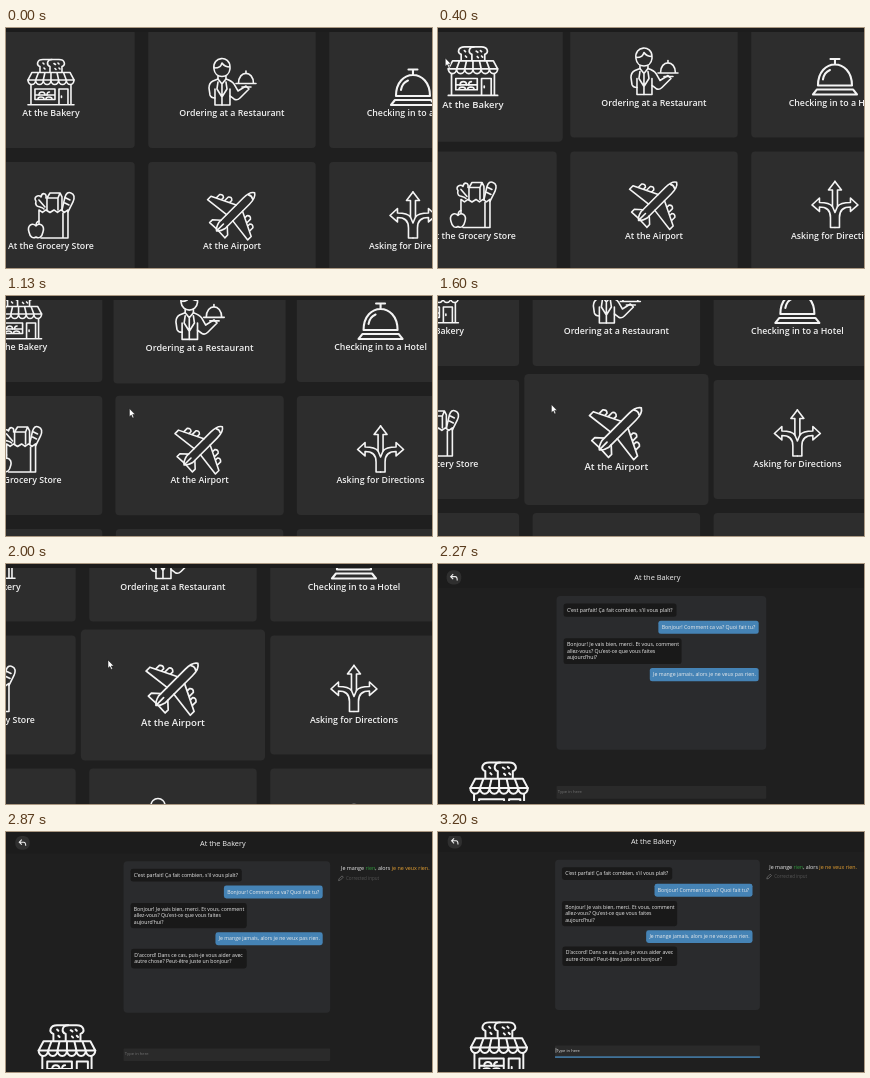
An HTML page that plays this animation: 426x240 px, repeating every 3270 ms.

```html
<!DOCTYPE html>
<html lang="en">
<head>
<meta charset="utf-8">
<title>Conversation practice</title>
<style>
  html, body { margin: 0; width: 100%; height: 100%; overflow: hidden; background: #1f1f1f; }
  svg { display: block; width: 100vw; height: 100vh; font-family: "Open Sans", "Noto Sans", sans-serif; }
  text { white-space: pre; }
  .icon { fill: none; stroke: #f4f4f4; stroke-width: 1.6; stroke-linejoin: round; stroke-linecap: round; }
  .label { fill: #f0f0f0; font-size: 8.8px; font-weight: 600; text-anchor: middle; }
  .chat { fill: #ececec; font-size: 5.2px; }
</style>
</head>
<body>
<svg viewBox="0 0 426 240" id="stage"></svg>
<script>
const LOOP = 3270, CUT = 2270;
const CARD = { w: 167.5, h: 119, dx: 181, dy: 133, x: 45, y: 1 };

const mirror = d => `<path d="${d}"/><path transform="scale(-1 1)" d="${d}"/>`;

// Icons have their top centre at 0,0 and are about 47 px wide and high.
const icons = {
  bakery: `
    <path d="M-1 13V7.500C-5 6-4 .5 1 .5H8C14 .5 15 6 11 7.500V13"/>
    <path d="M-11 13V7.500C-15 6-14 .5-8 .5H1"/>
    <path d="M-8 4l1 1M-7 9l1 1M3 4.500l1.500 1M7 4l1 1M4 9.500l1 1M8 9l1 1"/>
    <path d="M-19 13.500H19L23 21H-23ZM-12.500 13.500L-15.300 21M-6 13.500L-7.700 21M0 13.500V21M6 13.500L7.700 21M12.500 13.500L15.300 21"/>
    <path d="M-23 21${'a3.83 4.500 0 0 0 7.667 0'.repeat(6)}"/>
    <path d="M-20 26V45M20 26V45M-23 45.800H23M-16 30H4V40.500H-16ZM-16 36H4M8 45V30H17V45M10.500 37V38.500"/>
    <path d="M-12 36q0-3 3-3t3 3M-4 36q0-3 2.500-3M-13 40q0-2 3-2t3 2M-5 40q0-2 3-2t3 2"/>`,
  waiter: `
    <path d="M-18 10C-20-3-2-4-2 8V10C-3 20-17 20-18 10ZM-18 9C-12 9-11 7-10 4C-8 7-5 8-2 8"/>
    <path d="M-14 17V20L-19 22Q-23 24-23 29L-22 36Q-21 39-17 39V46H-2V37L2 40Q5 42 8 39L17 30L14 27L6 32L2 25Q0 22-6 20V17"/>
    <path d="M-14 20L-10 25L-6 20M-17 39V30M-2 37V30M-10 25V46M-14 23l-1 7 5 8 5-8-1-7"/>
    <path d="M4 24.500H24M6.500 24.500C6.500 11 21.500 11 21.500 24.500M14 14V12M10 28H19"/>`,
  bell: `
    <g stroke-width="2.100">
      <path d="M-4.500 10.500H4.500M0 11V16M-17 37C-17 9 17 9 17 37ZM-12 31Q-11 24-5 21.500"/>
      <path d="M-18 41H18L22 46H-22Z"/>
    </g>`,
  grocery: `
    <path d="M-12 32V18l3.500 2.500 3.500-2.500 4 2.500 4-2.500 3.500 2.500 3.500-2.500 3.500 2.500 3.500-2.500V46H-10M12 21V46"/>
    <path d="M11 18L14 5Q16-1 20 1Q25 3 22 10L17 20M15 6l4 2M14 11l4 2"/>
    <path d="M-4 18V6L-1 1H9L11 5V18M-4 6H7L9 1M7 6V18"/>
    <path d="M-7 17C-10 14-17 16-15 9C-18 6-13 2-10 5C-9 0-4 1-5 6M-12 8L-6 15"/>
    <path d="M-15 34C-19 30-24 34-22 40C-21 45-18 47-15 45C-12 47-9 45-8 40C-6 34-11 30-15 34ZM-15 34Q-15 30-12 29"/>`,
  plane: `
    <g transform="translate(.5 23) rotate(45) scale(.98)">
      <path d="M0-32C-3.500-30-4.500-24-4.500-20V15Q-3 21 0 23Q3 21 4.500 15V-20C4.500-24 3.500-30 0-32ZM-3-26Q0-28 3-26M0 13V23"/>
      ${mirror('M4.500-10L29 2V7L4.500 4M4.500 12L11 18V22L1.500 21.500M11-7V-10Q13.500-13 16-10V-4.500M19-3V-6Q21.500-8.500 24-5.500V-.5')}
    </g>`,
  arrows: `
    ${mirror('M0 0L6.500 8.500H2.500V25C5 21.500 9 21 15.500 21V16.500L23 23.500L15.500 30V25.500C9 25.500 4.500 28 4.500 36V46H0')}
    <path d="M-2.500 25L0 31L2.500 25"/>`,
  person: `<circle cx="-15" cy="7" r="7"/><path d="M-24 30C-24 16-6 16-6 30M4 14H22V30H4ZM8 20H18"/>`,
  badge: `<circle cy="16" r="10"/><path d="M-18 40C-18 24 18 24 18 40Z"/>`,
};

const cards = [
  [0, 0, 'bakery', 'At the Bakery', 205, 780],
  [1, 0, 'waiter', 'Ordering at a Restaurant', 790, 935],
  [2, 0, 'bell', 'Checking in to a Hotel'],
  [0, 1, 'grocery', 'At the Grocery Store'],
  [2, 1, 'arrows', 'Asking for Directions'],
  [0, 2, 'bell', ''],
  [1, 2, 'person', ''],
  [2, 2, 'badge', ''],
  [1, 1, 'plane', 'At the Airport', 1090, 9999],
].map(([col, row, icon, label, enter, leave]) => ({
  x: CARD.x + col * CARD.dx, y: CARD.y + row * CARD.dy + CARD.h / 2, icon, label, enter, leave,
}));

const cardMarkup = c => `
  <g class="card">
    <rect x="${-CARD.w / 2}" y="${-CARD.h / 2}" width="${CARD.w}" height="${CARD.h}" rx="4" fill="#2d2d2d"/>
    <g class="icon" transform="translate(0 -29.500)">${icons[c.icon]}</g>
    <text class="label" y="27.800">${c.label}</text>
  </g>`;

const bubble = (x, y, w, h, fill, lines, pad = 3.300) => `
  <rect x="${x}" y="${y}" width="${w}" height="${h}" rx="2.500" fill="${fill}"/>
  ${lines.map((s, i) => `<text class="chat" x="${x + pad}" y="${y + 8 + i * 6.400}">${s}</text>`).join('')}`;

const DARK = '#191919', BLUE = '#4583b5';

document.getElementById('stage').innerHTML = `
  <rect width="426" height="240" fill="#1f1f1f"/>
  <g id="menu">
    <g id="grid">${cards.map(cardMarkup).join('')}</g>
    <path id="cursor" d="M0 0V8.200L1.900 6.600L3.200 9.500L4.600 8.900L3.300 6H5.800Z" fill="#fff" stroke="#111" stroke-width=".5"/>
  </g>
  <g id="talk">
    <g id="view">
      <rect x="-10" y="-10" width="460" height="32.500" fill="#1c1c1c"/>
      <rect x="9" y="5" width="14.500" height="14" rx="6" fill="#2f2f2f"/>
      <path d="M15.500 8.800L13 11.300L15.500 13.800M13 11.300H17.500Q19.500 11.300 19.500 15" fill="none" stroke="#eee" stroke-width="1.100"/>
      <text x="218" y="15" fill="#f0f0f0" font-size="7.400" text-anchor="middle">At the Bakery</text>
      <rect x="118" y="30.500" width="208" height="152.500" rx="4" fill="#2a2b2d"/>
      ${bubble(125, 38, 112, 13, DARK, ["C'est parfait! Ça fait combien, s'il vous plaît?"])}
      ${bubble(219, 55, 99.500, 13, BLUE, ['Bonjour! Comment ca va? Quoi fait tu?'])}
      ${bubble(125, 72.500, 117, 25.500, DARK, ['Bonjour! Je vais bien, merci. Et vous, comment', 'allez-vous? Qu\'est-ce que vous faites', 'aujourd\'hui?'])}
      ${bubble(210.500, 102, 108, 13, BLUE, ['Je mange jamais, alors je ne veux pas rien.'])}
      <g id="reply">${bubble(125.500, 118.500, 116.500, 20, DARK, ["D'accord! Dans ce cas, puis-je vous aider avec", 'autre chose? Peut-être juste un bonjour?'])}</g>
      <g id="notes">
        <text x="335.500" y="39.500" fill="#ececec" font-size="5.400">Je mange <tspan fill="#2f9a3c">rien</tspan>, alors <tspan fill="#e5a032">je ne veux rien.</tspan></text>
        <path d="M333 50l.5-1.800 3-3 1.300 1.300-3 3Z" fill="none" stroke="#777" stroke-width=".7"/>
        <text x="340.500" y="49.300" fill="#555" font-size="4.600">Corrected input</text>
      </g>
      <rect x="118" y="219" width="208" height="12.500" rx="1" fill="#2a2a2a"/>
      <text id="hint" x="119.300" y="225.700" font-size="4.200">Type in here</text>
      <g id="focus">
        <rect x="118" y="230.200" width="208" height="1.300" fill="#4a8fc4"/>
        <rect x="118.700" y="221.500" width=".5" height="5" fill="#eee"/>
      </g>
      <g class="icon" transform="translate(61 195) scale(1.240)">${icons.bakery}</g>
    </g>
    <rect y="237" width="426" height="3" fill="#1f1f1f"/>
  </g>
  <rect width="426" height="4" fill="#1c1c1c"/>`;

const $ = id => document.getElementById(id);
const cardNodes = [...document.querySelectorAll('.card')];
const clamp = v => Math.min(1, Math.max(0, v));
const smooth = v => { v = clamp(v); return v * v * (3 - 2 * v); };
const move = (node, x, y, s = 1) => node.setAttribute('transform', `translate(${x} ${y}) scale(${s})`);

// Each key is [time, x, y].
const panKeys = [[0, 0, 0], [400, -10, -10.5], [1130, -32.4, -34], [1600, -47.6, -50], [2000, -59, -62.5], [CUT, -66, -70.5]];
const cursorKeys = [[0, -30, 20], [180, -6, 30], [400, 17, 40.5], [800, 132, 78], [935, 150, 121], [1130, 155.8, 146.5], [1350, 161, 158.5], [CUT, 161, 158.5]];

function along(keys, t) {
  const i = Math.max(1, keys.findIndex(k => k[0] >= t));
  const [t0, x0, y0] = keys[i - 1], [t1, x1, y1] = keys[i];
  const p = (t - t0) / (t1 - t0);
  return [x0 + (x1 - x0) * p, y0 + (y1 - y0) * p];
}

function drawMenu(t) {
  const [px, py] = along(panKeys, t);
  const [cx, cy] = along(cursorKeys, t);
  move($('grid'), px, py);
  move($('cursor'), cx + px, cy + py);
  cards.forEach((c, i) => {
    const hover = c.enter ? smooth((t - c.enter) / 300) * (1 - smooth((t - c.leave) / 300)) : 0;
    move(cardNodes[i], c.x, c.y, 1 + 0.1 * hover);
  });
}

function drawTalk(t) {
  const u = (t - 2600) / 600;
  move($('view'), 0.8 * u, -2.3 * u, 1 - 0.015 * u);
  const reply = clamp((t - 2565) / 300);
  move($('reply'), -10 * (1 - reply), 0);
  $('reply').setAttribute('opacity', reply);
  move($('notes'), 145 * (1 - clamp((t - 2400) / 600)) ** 3, 0);
  const focus = clamp((t - 2880) / 150);
  $('focus').setAttribute('opacity', focus);
  const tone = 115 + 105 * focus;
  $('hint').setAttribute('fill', `rgb(${tone},${tone},${tone})`);
}

function draw(t) {
  const inMenu = t < CUT;
  $('menu').setAttribute('display', inMenu ? 'inline' : 'none');
  $('talk').setAttribute('display', inMenu ? 'none' : 'inline');
  (inMenu ? drawMenu : drawTalk)(t);
}

const start = performance.now();
function tick() {
  draw((performance.now() - start) % LOOP);
  requestAnimationFrame(tick);
}
tick();
</script>
</body>
</html>
```
